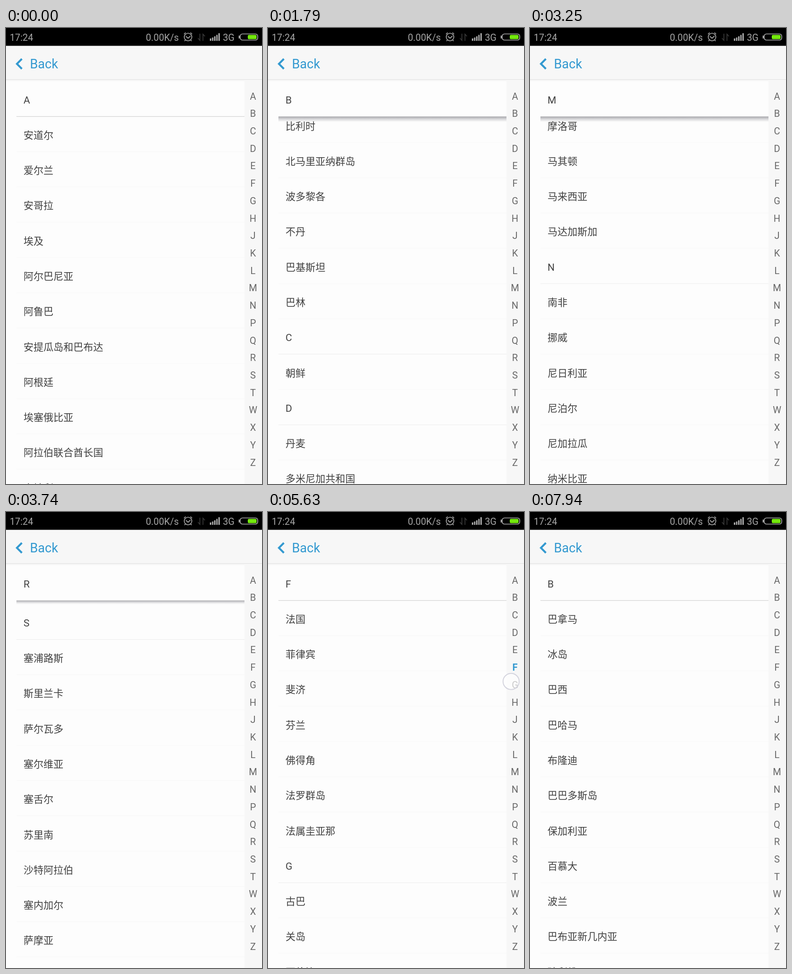
Write an HTML page that moves like this. It is 540 px wide and 960 px high and loops after 8 s.

```html
<!DOCTYPE html>
<html lang="zh">
<head>
<meta charset="utf-8">
<title>Country picker</title>
<style>
html, body { margin: 0; width: 100%; height: 100%; overflow: hidden; background: #fdfdfd; }
svg { display: block; width: 100vw; height: 100vh; }
text { font-family: Roboto, "Noto Sans CJK SC", "Noto Sans CJK", sans-serif; }
.row { font-size: 21px; fill: #404040; }
.index { font-size: 20px; fill: #686868; text-anchor: middle; }
.index.on { fill: #3399d0; font-weight: 700; }
.status { font-size: 19.8px; fill: #a6a6a6; }
</style>
</head>
<body>
<svg id="stage" viewBox="0 0 540 960">
  <defs>
    <clipPath id="listClip"><rect y="112" width="540" height="848"/></clipPath>
    <linearGradient id="shade" x1="0" y1="0" x2="0" y2="1">
      <stop offset="0" stop-color="#a0a0a6"/>
      <stop offset=".5" stop-color="#a0a0a6" stop-opacity=".4"/>
      <stop offset="1" stop-color="#a0a0a6" stop-opacity="0"/>
    </linearGradient>
  </defs>
  <rect width="540" height="960" fill="#fdfdfd"/>
  <g id="list" clip-path="url(#listClip)"></g>
  <rect x="503" y="112" width="37" height="848" fill="#f7f7f7"/>
  <g id="letters"></g>
  <rect y="37" width="540" height="75" fill="#f7f7f7"/>
  <path d="M0 108.5H540" stroke="#dfdfdf"/>
  <path d="M33.5 65 23 75.5 33.5 86" fill="none" stroke="#3399d0" stroke-width="4"/>
  <text x="50.5" y="85" font-size="27" fill="#3399d0">Back</text>
  <rect width="540" height="37.5"/>
  <g class="status">
    <text x="8" y="26.5">17:24</text>
    <text x="295" y="26.5">0.00K/s</text>
    <text x="457.5" y="26.5">3G</text>
  </g>
  <g fill="none" stroke="#a6a6a6" stroke-width="1.7">
    <circle cx="384" cy="19" r="8"/>
    <path d="M379.5 17.5 384 21.5 389 17M375.5 13 379 9.5M392.5 13 389 9.5M378.5 25 376.5 27.5M389.5 25 391.5 27.5"/>
    <path d="M431.5 22V27M436 20V27M440.5 17.5V27M445 14.5V27M449.5 11V27" stroke-width="3"/>
    <path d="M409 12V26L405 21.5M415.5 27V13L419.5 17.5" stroke="#3a3a3a"/>
    <rect x="494" y="12.5" width="37" height="13" rx="5"/>
    <path d="M492 16V22" stroke-width="2.5"/>
  </g>
  <rect x="510" y="14.5" width="18.5" height="9" rx="2.5" fill="#73e80c"/>
  <circle id="touch" r="17" fill="#fff" fill-opacity=".65" stroke="#d4d4de" stroke-width="2"/>
</svg>
<script>
const LOOP = 8000, STEP = 20, TOP = 112, ROW = 74.28, VIEW = 848;
const sections = `
A 安道尔 爱尔兰 安哥拉 埃及 阿尔巴尼亚 阿鲁巴 安提瓜岛和巴布达 阿根廷 埃塞俄比亚 阿拉伯联合酋长国 奥地利 澳大利亚 阿塞拜疆 阿富汗 安圭拉 阿尔及利亚 阿曼
B 巴拿马 冰岛 巴西 巴哈马 布隆迪 巴巴多斯岛 保加利亚 百慕大 波兰 巴布亚新几内亚 玻利维亚 博茨瓦纳 白俄罗斯 贝宁 伯利兹 巴拉圭 比利时 北马里亚纳群岛 波多黎各 不丹 巴基斯坦 巴林
C 朝鲜
D 丹麦 多米尼加共和国 德国 东帝汶 多哥 多米尼克
E 厄瓜多尔 俄罗斯 厄立特里亚
F 法国 菲律宾 斐济 芬兰 佛得角 法罗群岛 法属圭亚那
G 古巴 关岛 哥伦比亚 哥斯达黎加 格林纳达 格鲁吉亚 圭亚那 冈比亚 刚果 格陵兰岛
H 海地 韩国 荷兰 洪都拉斯 哈萨克斯坦 黑山
J 柬埔寨 吉布提 加纳 基里巴斯 加拿大 捷克共和国 吉尔吉斯斯坦
K 卡塔尔 克罗地亚 科威特 肯尼亚 科特迪瓦 库克群岛 开曼群岛 喀麦隆 科摩罗
L 卢森堡 利比亚 罗马尼亚 黎巴嫩 卢旺达 老挝 立陶宛 莱索托 利比里亚 拉脱维亚
M 美国 蒙古 秘鲁 缅甸 墨西哥 马耳他 摩纳哥 毛里求斯 马尔代夫 摩洛哥 马其顿 马来西亚 马达加斯加
N 南非 挪威 尼日利亚 尼泊尔 尼加拉瓜 纳米比亚 尼日尔 瑙鲁
P 葡萄牙 帕劳
Q 乔治亚
R 日本 瑞典 瑞士
S 塞浦路斯 斯里兰卡 萨尔瓦多 塞尔维亚 塞舌尔 苏里南 沙特阿拉伯 塞内加尔 萨摩亚 圣基茨和尼维斯 苏丹 所罗门群岛 塞拉利昂 圣马力诺 斯威士兰 斯洛文尼亚 斯洛伐克 索马里 圣卢西亚
T 泰国 土耳其 突尼斯 坦桑尼亚 汤加 塔吉克斯坦 土库曼斯坦
W 危地马拉 委内瑞拉 乌兹别克斯坦 文莱 瓦努阿图 乌克兰 乌干达 乌拉圭
X 西班牙 希腊 新加坡 新西兰 匈牙利 叙利亚 新喀里多尼亚
Y 意大利 印度 英国 越南 以色列 伊朗 伊拉克 约旦 也门 牙买加 亚美尼亚 印度尼西亚
Z 智利 中国 乍得 赞比亚 中非共和国 直布罗陀 津巴布韦`.trim().split("\n").map(s => s.split(" "));

const items = sections.flat();
const heads = sections.map(s => items.indexOf(s[0]));
const lastPos = items.length - VIEW / ROW;
const at = (name, rows) => items.indexOf(name) - rows;

const pB = at("比利时", .74), pJ = at("J", 1), pM = at("摩洛哥", .74), pS = at("塞内加尔", 1.415);
const scroll = [
  [670, 0], [850, 4.5], [1100, 14], [1300, 19], [1400, 22.5], [1790, pB], [1900, pB + 3],
  [2030, pB + 10], [2520, pJ - 4], [2610, pJ], [2700, pJ + 5], [3120, pM - 6], [3250, pM],
  [3500, pM + 15], [3810, pS - 7], [3990, pS - 7], [4170, pS - 2.5], [4450, pS]
];
// Each touch has its own [time, x] and [time, y] keys.
const swipes = [
  { x: [[670, 400], [850, 415]], y: [[670, 690], [850, 350]] },
  { x: [[1260, 400], [1400, 415]], y: [[1260, 690], [1400, 350]] },
  { x: [[1850, 402], [2000, 416]], y: [[1850, 690], [2000, 340]] },
  { x: [[2470, 404], [2635, 420]], y: [[2470, 690], [2610, 324], [2635, 290]] },
  { x: [[3070, 396], [3245, 411]], y: [[3070, 690], [3245, 352]] },
  { x: [[3780, 398], [3990, 398], [4180, 412]], y: [[3780, 680], [3990, 680], [4180, 350]] }
];
const drag = {
  x: [[4820, 514], [6680, 511], [7880, 514]],
  y: [[4820, 143], [4900, 147], [6680, 832], [6920, 914], [7090, 914], [7420, 570], [7740, 182], [7880, 178]]
};

// Monotone cubic through the keys.
function curve(keys, t) {
  const n = keys.length - 1;
  if (t <= keys[0][0]) return keys[0][1];
  if (t >= keys[n][0]) return keys[n][1];
  const i = keys.findIndex(k => k[0] > t) - 1;
  const slope = j => (keys[j + 1][1] - keys[j][1]) / (keys[j + 1][0] - keys[j][0]);
  const tangent = j => {
    if (j === 0 || j === n) return 0;
    const a = slope(j - 1), b = slope(j);
    return a * b <= 0 ? 0 : 2 * a * b / (a + b);
  };
  const [t0, a] = keys[i], [t1, b] = keys[i + 1], d = t1 - t0, u = (t - t0) / d;
  const s = u * u * (3 - 2 * u);
  return a + (b - a) * s + d * u * (1 - u) * (tangent(i) * (1 - u) - tangent(i + 1) * u);
}

const $ = id => document.getElementById(id);
function add(parent, tag, attrs, text) {
  const el = document.createElementNS("http://www.w3.org/2000/svg", tag);
  set(el, attrs);
  if (text) el.textContent = text;
  return parent.appendChild(el);
}
function set(el, attrs) {
  for (const k in attrs) el.setAttribute(k, attrs[k]);
}

function makeRow(parent) {
  const g = add(parent, "g", {});
  add(g, "rect", { x: 22, width: 481, height: ROW, fill: "#fdfdfd" });
  const line = add(g, "path", { d: `M22 ${ROW}H503` });
  const label = add(g, "text", { class: "row", x: 37, y: 46.6 });
  return { g, line, label };
}
function fillRow(row, name, y, color) {
  set(row.g, { transform: `translate(0 ${y.toFixed(2)})` });
  set(row.line, { stroke: color });
  if (row.label.textContent !== name) row.label.textContent = name;
}

const rows = Array.from({ length: 13 }, () => makeRow($("list")));
const shadow = add($("list"), "rect", { x: 22, width: 481, fill: "url(#shade)" });
const pin = makeRow($("list"));
const letters = sections.map((s, i) =>
  add($("letters"), "text", { class: "index", x: 521, y: 150.5 + 36.72 * i }, s[0]));

function pickedLetter(t) {
  const i = Math.floor((curve(drag.y, t - 45) - 125) / 36.72);
  return Math.max(0, Math.min(letters.length - 1, i));
}

function drawList(pos) {
  const first = Math.floor(pos + 1e-6);
  rows.forEach((row, k) => {
    const i = first + k, name = items[i] || "";
    fillRow(row, name, TOP + (i - pos) * ROW, heads.includes(i) ? "#dcdcdc" : name ? "#f2f2f2" : "none");
  });
  const cur = heads.filter(h => h <= pos + 1e-6).pop();
  const next = heads.find(h => h > cur) ?? Infinity;
  const gap = (next - pos - 1) * ROW;
  const y = TOP + Math.min(0, gap);
  fillRow(pin, items[cur], y, "#cccccc");
  const depth = pos - cur < 1e-3 ? 0 : Math.max(0, Math.min(12, gap));
  set(shadow, { y: y + ROW - .5, height: depth });
}

function draw(t) {
  const indexing = t >= 4820;
  const picked = indexing ? pickedLetter(t) : -1;
  drawList(indexing ? Math.min(heads[picked], lastPos) : curve(scroll, t));
  letters.forEach((el, i) =>
    set(el, { class: i === picked && t < 7900 ? "index on" : "index" }));

  const touch = [...swipes, drag].find(s => t >= s.y[0][0] && t <= s.y[s.y.length - 1][0]);
  set($("touch"), touch
    ? { cx: curve(touch.x, t), cy: curve(touch.y, t), visibility: "visible" }
    : { visibility: "hidden" });
}

const refresh = t => Math.floor((t - 8) / STEP) * STEP + STEP / 2;

const start = performance.now();
function tick() {
  draw(refresh((performance.now() - start) % LOOP));
  requestAnimationFrame(tick);
}
tick();
</script>
</body>
</html>
```
